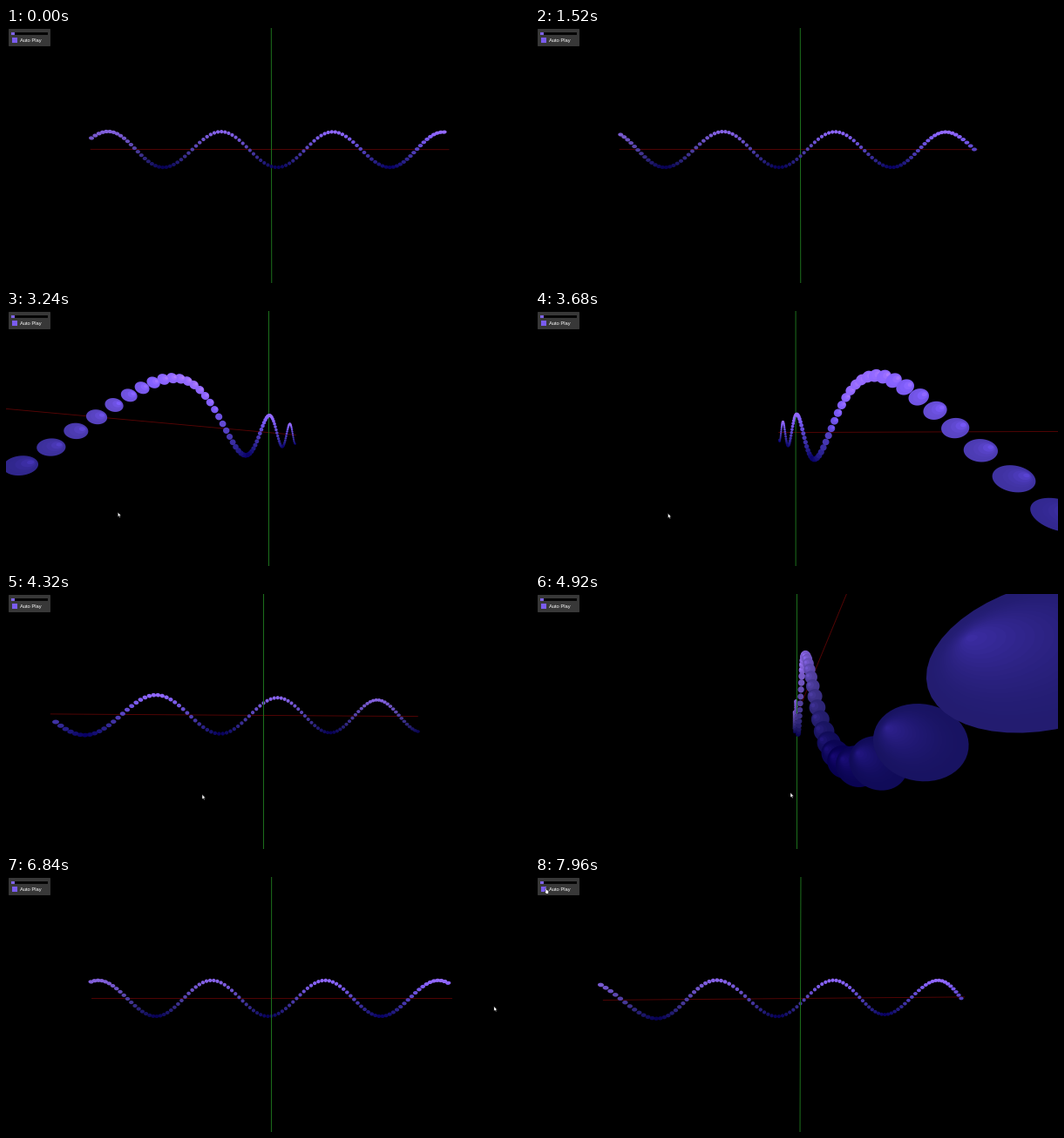
Write a matplotlib script that moves like this. It is 600 by 293 pixels and loops after 8 s.

```python
import numpy as np
import matplotlib.pyplot as plt
from matplotlib.animation import FuncAnimation
from matplotlib.collections import PolyCollection
from matplotlib.patches import Polygon, Rectangle

W, H, DPI = 600, 293, 100
STEP, FRAMES = 40, 200
PX = 72 / DPI

# Perspective camera orbiting a point slightly off the origin
FOCAL = H / 2 / np.tan(np.radians(37.5))
DIST = 9.27
TARGET = np.array([-0.22, -0.34, 0.0])
LIGHT = np.array([0.0, 0.45, 0.89])
RADIUS = 0.1
NEAR = 0.11

# Pointer path: time (ms), x, y
ENTER, HOVER = 1580, 7500
PATH = np.array([
    (ENTER, 58, 292), (2160, 69.6, 230.2), (3680, 153.5, 234.9),
    (4920, 294, 230.7), (5800, 346.5, 234.1), (6200, 362, 234.5),
    (6800, 560, 150), (7000, 564.2, 155), (HOVER, 22, 18), (7700, 13.5, 16)])
DRAGS = [(2160, 6200), (6800, 7000)]
LAG = 30
START = np.array([-0.5, -3.6])          # yaw, elevation in degrees
TURN = np.array([-360, 360]) / H        # degrees per dragged pixel

# Ball colour from trough to crest
LOW = np.array([8, 0, 92])
SPAN = np.array([131, 101, 154])
CURVE = np.array([0.8, 0.65, 0.85])
SIDE = np.array([0.08, 0.06, 0.15])     # gain on the faces towards -x

xs = -10 + 0.2 * np.arange(100)
turn = np.linspace(0, 2 * np.pi, 48, endpoint=False)
disc = np.column_stack([np.cos(turn), np.sin(turn)])


def pointer_at(t):
    return np.array([np.interp(t, PATH[:, 0], col) for col in PATH[:, 1:].T])


def camera(t):
    """Rows are right, up and the direction towards the viewer."""
    moved = sum(pointer_at(np.clip(t - LAG, a, b)) - pointer_at(a)
                for a, b in DRAGS)
    yaw, elev = np.radians(START + TURN * moved)
    sa, ca, se, ce = np.sin(yaw), np.cos(yaw), np.sin(elev), np.cos(elev)
    return np.array([(ca, 0, -sa), (-sa * se, ce, -ca * se),
                     (sa * ce, se, ca * ce)])


def to_view(points, cam):
    p = (points - TARGET) @ cam.T
    p[:, 2] = DIST - p[:, 2]
    return p


def axis_points(direction, cam):
    s = np.linspace(-10, 10, 401)[:, None]
    x, y, d = to_view(s * np.array(direction), cam).T
    ok = d > NEAR
    return W / 2 + FOCAL * x[ok] / d[ok], H / 2 - FOCAL * y[ok] / d[ok]


def ball_colors(points, cam):
    h = (points[:, 1:2] + 1) / 2
    gaze = TARGET + DIST * cam[2] - points
    toward = -gaze[:, :1] / np.linalg.norm(gaze, axis=1, keepdims=True)
    return (LOW + SPAN * h ** CURVE) * (1 + SIDE * toward)


def ball(p, color, glint):
    """Projected sphere as stacked ellipses, lighter towards the glint."""
    x, y, d = p
    rho, k = np.hypot(x, y), d * d - RADIUS ** 2
    along = FOCAL * RADIUS * np.sqrt(rho ** 2 + k) / k
    across = FOCAL * RADIUS / np.sqrt(k)
    ang = np.arctan2(y, x)
    rot = np.array([(np.cos(ang), -np.sin(ang)), (np.sin(ang), np.cos(ang))])
    shape = rot @ np.diag([along, across]) @ rot.T
    mid = np.array([x, y]) * FOCAL * d / k
    layers = 1 if across < 4 else int(np.clip(across / 2, 4, 22))
    polys, colors = [], []
    for f in np.arange(layers) / layers:
        pts = mid + (glint * f + disc * (1 - f)) @ shape
        polys.append(np.column_stack([W / 2 + pts[:, 0], H / 2 - pts[:, 1]]))
        lit = color * (1 + 0.3 * f ** 2) + np.array([16, 9, 20]) * f ** 2
        colors.append(np.clip(lit / 255, 0, 1))
    return polys, colors


fig = plt.figure(figsize=(W / DPI, H / DPI), dpi=DPI, facecolor="black")
ax = fig.add_axes([0, 0, 1, 1])
ax.set_xlim(0, W)
ax.set_ylim(H, 0)
ax.axis("off")

red, = ax.plot([], [], color="#580505", lw=0.9 * PX, zorder=1)
green, = ax.plot([], [], color="#1d701d", lw=PX, zorder=3)
far_balls = PolyCollection([], linewidths=0, zorder=2)
near_balls = PolyCollection([], linewidths=0, zorder=4)
ax.add_collection(far_balls)
ax.add_collection(near_balls)


def box(x, y, w, h, color, edge="none"):
    ax.add_patch(Rectangle((x, y), w, h, fc=color, ec=edge, lw=0.6 * PX,
                           zorder=6))


box(3.3, 1.3, 46.6, 18.6, "#383838", "#4a4a4a")
box(6, 4.6, 41.5, 3.2, "#050505")
box(6, 4.6, 3.6, 3.2, "#7d62e6")
box(6.5, 10.6, 6.4, 6.4, "#7a5cf0")
ax.text(15.6, 16.1, "Auto Play", color="white", fontsize=5.8 * PX,
        family="Liberation Sans", va="baseline", zorder=7)

ARROW = np.array([(-1, -2.5), (-1, 3), (0.2, 2), (1.2, 3.9), (2, 3.5),
                  (1.2, 1.7), (2.8, 1.6)])
HAND = np.array([(-1.5, -3.6), (-0.5, -3.6), (-0.3, -1.2), (2.2, -0.4),
                 (1.9, 3.2), (-0.9, 3.2), (-2.6, 0.4), (-1.4, 0.6)])
pointer = Polygon(ARROW, closed=True, fc="white", ec="black", lw=0.4 * PX,
                  zorder=9)
ax.add_patch(pointer)


def draw(i):
    t = i * STEP
    cam = camera(t)
    red.set_data(*axis_points((1, 0, 0), cam))
    green.set_data(*axis_points((0, 1, 0), cam))

    ys = np.sin(xs - 1.89 + 0.99 * t / 1000)
    points = np.column_stack([xs, ys, 0 * xs])
    view = to_view(points, cam)
    base = ball_colors(points, cam)
    glint = 0.8 * cam[:2] @ LIGHT
    middle = to_view(np.zeros((1, 3)), cam)[0, 2]

    order = np.argsort(-view[:, 2])
    depth = view[order, 2]
    for coll, mask in ((far_balls, depth > middle),
                       (near_balls, (depth <= middle) & (depth > NEAR))):
        polys, colors = [], []
        for j in order[mask]:
            p, c = ball(view[j], base[j], glint)
            polys += p
            colors += c
        coll.set_verts(polys)
        coll.set_facecolor(colors)

    pointer.set_xy((HAND if t >= HOVER else ARROW) + pointer_at(t))
    pointer.set_visible(t >= ENTER)
    return red, green, far_balls, near_balls, pointer


anim = FuncAnimation(fig, draw, frames=FRAMES, init_func=lambda: draw(0),
                     interval=STEP, repeat=True, repeat_delay=0, blit=False)
plt.show()
```
